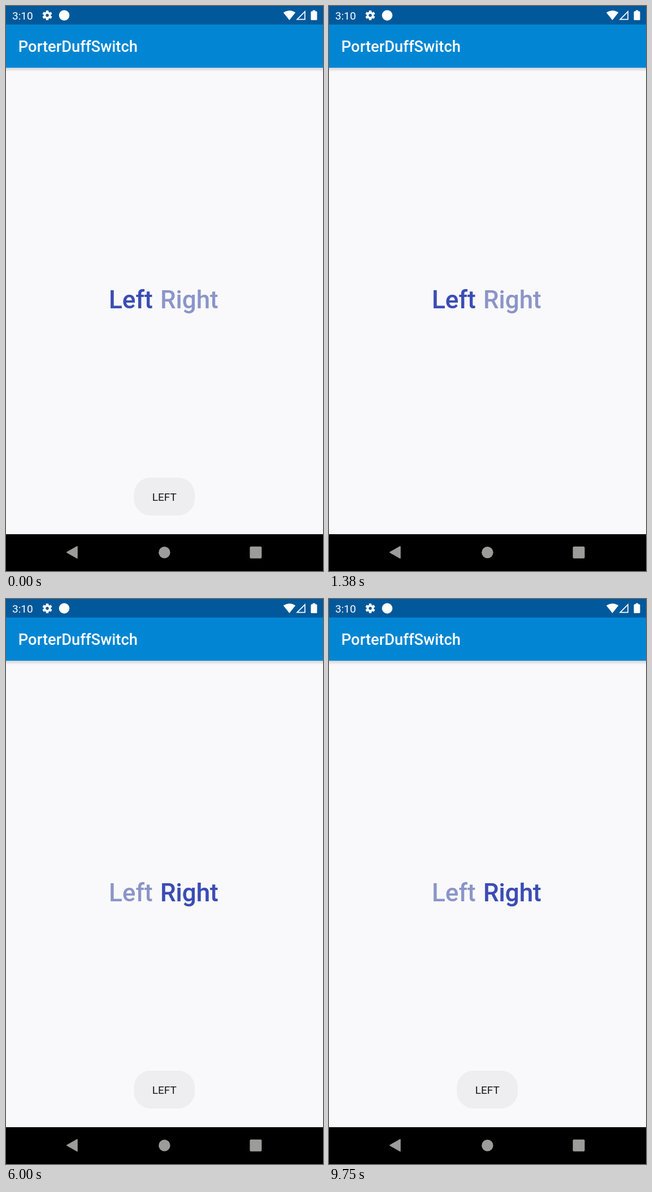
An HTML page for the animation above (9830 ms loop, 561x998 px).

```html
<!DOCTYPE html>
<html lang="en">
<head>
<meta charset="utf-8">
<title>Two-way text switch</title>
<style>
  html, body { margin: 0; width: 100%; height: 100%; overflow: hidden; background: #f9f9fb; }
  svg { display: block; width: 100vw; height: 100vh; }
  text { font-family: Roboto, "Noto Sans", sans-serif; }
  .label { font-size: 44px; font-weight: 500; }
  .small { font-size: 19.1px; }
</style>
</head>
<body>
<svg viewBox="0 0 561 998" preserveAspectRatio="none">
  <defs>
    <linearGradient id="shadow" x2="0" y2="1">
      <stop stop-color="#000" stop-opacity=".16"/>
      <stop offset="1" stop-color="#000" stop-opacity="0"/>
    </linearGradient>
    <clipPath id="window"><rect id="thumb" y="480" height="80"/></clipPath>
    <g id="labels" class="label">
      <text x="182" y="534">Left</text>
      <text x="273" y="534">Right</text>
    </g>
  </defs>

  <rect width="561" height="998" fill="#f9f9fb"/>
  <rect y="109" width="561" height="7" fill="url(#shadow)"/>
  <rect y="32" width="561" height="77" fill="#0286d3"/>
  <rect width="561" height="32.7" fill="#01599b"/>
  <text x="21.8" y="81.3" font-size="27.3" font-weight="500" fill="#fff">PorterDuffSwitch</text>

  <g id="status" fill="#fff">
    <text class="small" x="11" y="24">3:10</text>
    <g transform="translate(73 16.5)">
      <circle r="4.6" fill="none" stroke="#fff" stroke-width="3.6"/>
      <g id="teeth"></g>
    </g>
    <circle cx="103" cy="16.5" r="9.3"/>
    <path d="M501.5 25 490.8 11.6Q501.5 4.4 512.2 11.6Z"/>
    <path d="M529 9.8V23.7H515.2Z" fill="none" stroke="#fff" stroke-width="1.7"/>
    <path d="M541 9.3h1.8V7.6h4.4v1.7h1.8q1.5 0 1.5 1.5v12.7q0 1.5-1.5 1.5h-8q-1.5 0-1.5-1.5V10.8q0-1.5 1.5-1.5Z"/>
  </g>

  <use href="#labels" fill="#8b95c8"/>
  <g clip-path="url(#window)"><use href="#labels" fill="#3b4db4"/></g>

  <g id="toast">
    <rect id="bubble" y="833" height="67" rx="30" fill="#eeeef1"/>
    <text id="message" class="small" x="280.3" y="873.5" text-anchor="middle" fill="#161616"></text>
  </g>

  <rect y="933" width="561" height="65"/>
  <g fill="#9c9c9a">
    <path d="M108 965 126 954.8V975.2Z" stroke="#9c9c9a" stroke-width="1.6" stroke-linejoin="round"/>
    <circle cx="280.4" cy="965.2" r="10.2"/>
    <rect x="431.5" y="954.8" width="21" height="21" rx="2"/>
  </g>
</svg>
<script>
  const LOOP = 9830, SLIDE = 300, FADE = 300, TOAST_HOLD = 2000;
  const toggles = [2500, 3850, 5200, 6550, 7923];
  const toasts = [
    { text: 'LEFT', start: -1920 },
    { text: 'RIGHT', start: 2580 },
    { text: 'LEFT', start: 4860 },
    { text: 'RIGHT', start: 7140 },
    { text: 'LEFT', start: 9420 }
  ];
  const edges = { left: 176, middle: 267, right: 386 };

  const $ = id => document.getElementById(id);
  const set = (el, attrs) => Object.entries(attrs).forEach(([k, v]) => el.setAttribute(k, v));
  const clamp = v => Math.min(1, Math.max(0, v));
  const ease = p => (1 - Math.cos(Math.PI * clamp(p))) / 2;
  const mix = (a, b, p) => a + (b - a) * p;

  $('teeth').innerHTML = Array.from({ length: 6 }, (_, i) =>
    `<rect x="-2.2" y="-8.6" width="4.4" height="4" rx=".6" transform="rotate(${i * 60})"/>`).join('');

  // Each toggle moves the window the opposite way to the one before.
  function switchPosition(t) {
    return toggles.reduce((pos, start, i) =>
      pos + (i % 2 ? -1 : 1) * ease((t - start) / SLIDE), 0);
  }

  function toastOpacity(age) {
    return Math.min(clamp(age / FADE), clamp((TOAST_HOLD + FADE - age) / FADE));
  }

  function render(t) {
    const pos = switchPosition(t);
    const x = mix(edges.left, edges.middle, pos);
    set($('thumb'), { x, width: mix(edges.middle, edges.right, pos) - x });

    const toast = toasts.filter(item => item.start <= t).pop();
    const width = toast.text === 'LEFT' ? 108 : 120;
    set($('toast'), { opacity: toastOpacity(t - toast.start) });
    set($('bubble'), { x: 280.2 - width / 2, width });
    $('message').textContent = toast.text;
  }

  const origin = performance.now();
  function tick() {
    render((performance.now() - origin) % LOOP);
    requestAnimationFrame(tick);
  }
  tick();
</script>
</body>
</html>
```
